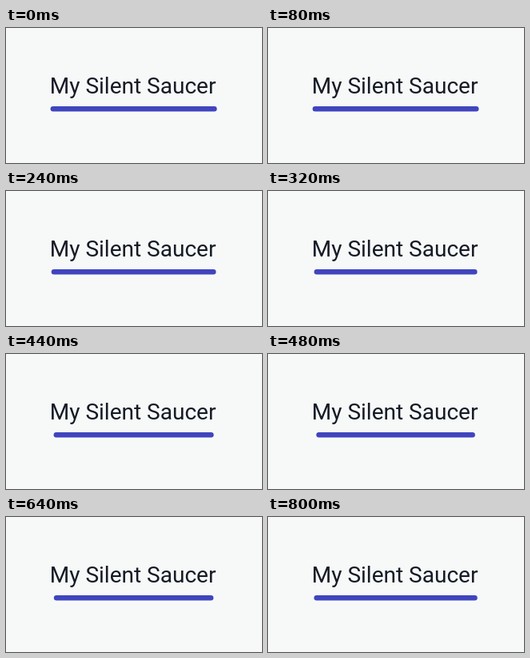
Recreate the animation shown at these times as an HTML page. Size 320 px wide and 169 px high, loop 840 ms.

```html
<!DOCTYPE html>
<html lang="en">
<head>
<meta charset="utf-8">
<title>My Silent Saucer</title>
<style>
  html, body { margin: 0; width: 100%; height: 100%; overflow: hidden; background: #f7f9f9; }
  svg { display: block; width: 100vw; height: 100vh; }
  text { font: 400 28px Roboto, sans-serif; fill: #151a25; }
</style>
</head>
<body>
<svg viewBox="0 0 320 169">
  <text x="54.8" y="82">My Silent Saucer</text>
  <rect id="bar" y="98" height="6.5" rx="3.25" fill="#4045be"/>
</svg>
<script>
  const LOOP = 840, STEP = 40, TURN = 560;
  const CENTER = 159.6, FULL = 104, SHRINK = 6.6, REGROW = 4.8;
  const bar = document.getElementById('bar');

  const easeIn = u => u ** 2.1;
  const easeOut = u => 1 - (1 - u) ** 2;

  // The bar slowly draws in, then springs back out.
  function halfWidth(t) {
    if (t <= TURN) return FULL - SHRINK * easeIn(t / TURN);
    return FULL - SHRINK + REGROW * easeOut((t - TURN) / (LOOP - TURN));
  }

  function draw(t) {
    const half = halfWidth(Math.floor(t / STEP) * STEP);
    bar.setAttribute('x', CENTER - half);
    bar.setAttribute('width', 2 * half);
  }

  const start = performance.now();
  function tick() {
    draw((performance.now() - start) % LOOP);
    requestAnimationFrame(tick);
  }
  tick();
</script>
</body>
</html>
```
